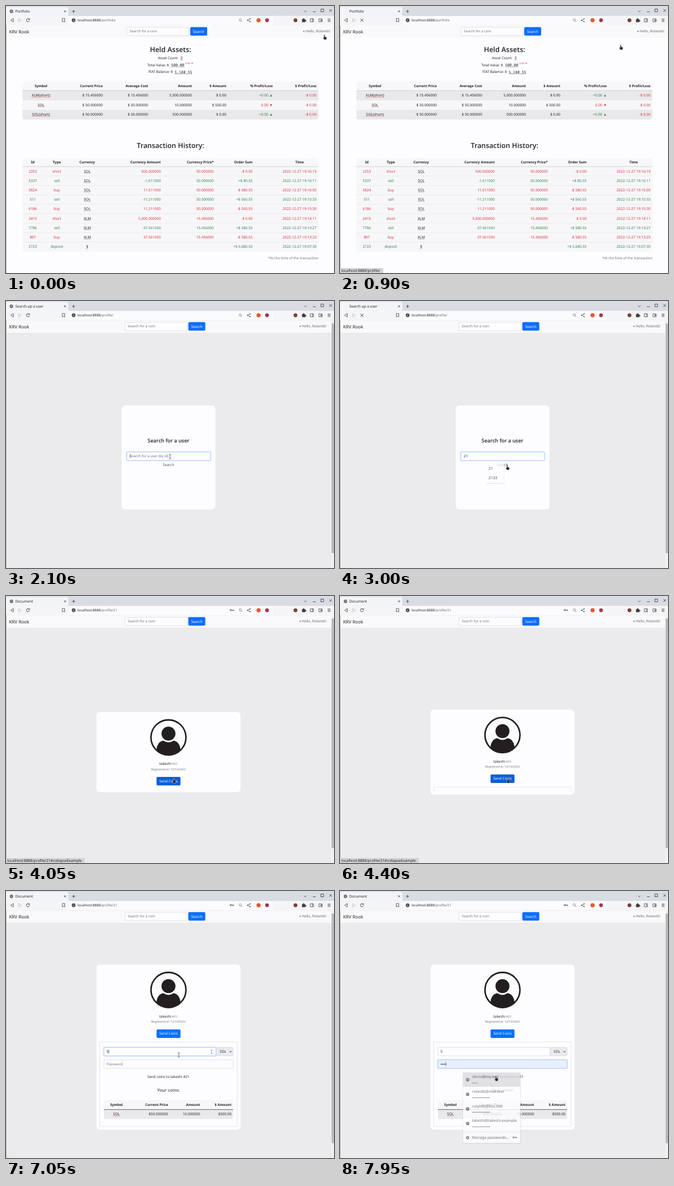
Animation of 600 by 487 pixels, one loop 8000 ms. Source, as an HTML page:

```html
<!DOCTYPE html>
<html lang="en">
<head>
<meta charset="utf-8">
<title>Coin portfolio</title>
<style>
html, body { margin: 0; width: 100%; height: 100%; overflow: hidden; background: #fdfcfe; }
#stage { display: block; width: 100vw; height: 100vh; }
text { font-family: "Noto Sans", "Open Sans", sans-serif; text-rendering: geometricPrecision; white-space: pre; }
.mono { font-family: "Noto Sans Mono", "DejaVu Sans Mono", monospace; }
.heading { font-family: "Open Sans", "Noto Sans", sans-serif; font-weight: 600; }
</style>
</head>
<body>
<svg id="stage" viewBox="0 0 600 487" preserveAspectRatio="none"></svg>
<script>
const LOOP = 8000;
const INK = '#222125', GREY = '#727176', RED = '#d6323f', GREEN = '#24874a', BLUE = '#0d6efd',
      PAPER = '#fdfcfe', PAGE = '#ebeaec', STRIPE = '#e9e8ea', PALE = '#f7f6f8', EDGE = '#d5d5da',
      LINK = '#dd4a55';
const BRAND = 'KRV Rook', USER = 'Rolands', PEER = 'takeshi';
const stage = document.getElementById('stage');

// ---- drawing helpers (text y is the visual middle of the line) ----
const text = (x, y, s, { size = 6.45, fill = INK, anchor = 'start', weight = 400, cls = '' } = {}) =>
  `<text x="${x}" y="${y + size * .35}" font-size="${size}" fill="${fill}" text-anchor="${anchor}" font-weight="${weight}" class="${cls}">${s}</text>`;
const mid = (x, y, s, o) => text(x, y, s, { ...o, anchor: 'middle' });
const heading = (x, y, s, size, fill) => mid(x, y, s, { size, fill, cls: 'heading' });
const rect = (x, y, w, h, fill, r = 0, extra = '') =>
  `<rect x="${x}" y="${y}" width="${w}" height="${h}" rx="${r}" fill="${fill}" ${extra}/>`;
const path = (d, stroke = '#3c3c42', width = .9, fill = 'none') =>
  `<path d="${d}" stroke="${stroke}" stroke-width="${width}" fill="${fill}"/>`;
const circle = (x, y, r, fill, extra = '') => `<circle cx="${x}" cy="${y}" r="${r}" fill="${fill}" ${extra}/>`;
const group = (s, attrs) => `<g ${attrs}>${s}</g>`;
const stroke = (color, width = .7) => `stroke="${color}" stroke-width="${width}"`;
const underline = (x, y, w, color) =>
  `<path d="M${x} ${y}h${w}" stroke="${color}" stroke-width=".7" stroke-dasharray="1.2 .6"/>`;

const between = (t, a, b) => t >= a && t < b;
const smooth = (t, a, b) => {
  const p = Math.min(1, Math.max(0, (t - a) / (b - a)));
  return p * p * (3 - 2 * p);
};

const field = (x, y, w, h, { focus = false, fill = PAPER } = {}) =>
  (focus ? rect(x - .6, y - .6, w + 1.2, h + 1.2, 'none', 2.4, stroke('#cfe2ff', 1.4)) : '') +
  rect(x, y, w, h, fill, 2, stroke(focus ? '#9cc4fb' : EDGE));
const button = (x, y, w, h, label, fill = BLUE) =>
  rect(x, y, w, h, fill, 2) + mid(x + w / 2, y + h / 2, label, { fill: '#fff', weight: 500 });
const globe = (x, y, r = 3.1) => circle(x, y, r, '#5b5d63') +
  path(`M${x - 2} ${y - 1}l1.6 1 .2 1.6M${x + .3} ${y - 2}l.4 1.3 1.4 .6`, '#e8e9ec', .8);
const key = (x, y) => circle(x - 2, y, 1.4, 'none', stroke('#444', .9)) + path(`M${x - .5} ${y}h4v1.5M${x + 2} ${y}v1.3`, '#444');

// columns: [x, anchor]; cells: strings or [string, colour]
const tableRow = (columns, cells, y, opts = {}) => cells.map((cell, i) => {
  const [s, fill = INK] = [].concat(cell);
  const [x, anchor] = columns[i];
  return text(x, y, s, { size: 6.55, fill, anchor, ...opts });
}).join('');
const headRow = (columns, cells, y) => tableRow(columns, cells, y, { size: 6.3, weight: 700 });

// ---- browser window ----
function browser({ title, url, loading, hasKey }) {
  const [host, slug] = url.split(/(?=\/)(.*)/s);
  const tools = '#3c3c42';
  return rect(0, 0, 600, 18.5, '#d9dce3') +
    path('M0 18.5V1.5H111Q114 1.5 114 5V18.5Z', 'none', 0, '#f3f4f7') +
    rect(0, 18, 600, 17.5, '#f5f5f8') + rect(114, 19, 374, 15.5, '#fbfbfd', 2) +
    (loading ? '' : globe(10, 9.7)) + text(17, 9.8, title, { size: 6.6 }) +
    path('M106.3 8l3.4 3.4M109.7 8l-3.4 3.4M120.8 9.8h5.6M123.6 7v5.6') +
    path('M545.2 8.6l2.2 2.2 2.2-2.2M561.5 10.5h5M576 5.5h5v5h-5zM591.6 6l4.4 4.4M596 6l-4.4 4.4', tools) +
    path('M13.3 22.8v6.4L8.4 26z', tools, .8) + path('M23.2 22.8v6.4l4.9-3.2z', '#b4b6bc', .8) +
    (loading ? path('M37.5 23.3l5.4 5.4M42.9 23.3l-5.4 5.4', tools, 1)
             : path('M42.6 24.3A2.9 2.9 0 1 0 43 26.6M43 22.6v2.1h-2.1', tools, 1)) +
    path('M103 22.8h4.4v6.4l-2.2-1.7-2.2 1.7z', tools, .8) +
    circle(123.7, 26, 3.4, '#4a4b50') + path('M123.7 25.5v2.4M123.7 23.8v.8', '#fff', .8) +
    text(131, 25.9, `${host}<tspan fill="#66676d">${slug || ''}</tspan>`, { size: 6.2 }) +
    (hasKey ? key(413, 25.7) : '') +
    circle(428.5, 25.3, 2.1, 'none', stroke('#77787e', .8)) + path('M430 26.9l2 2', '#77787e') +
    path('M446.5 23.4l-4.5 2.5 4.5 2.6', tools, .7) +
    [[446.5, 23.4], [442, 25.9], [446.5, 28.5]].map(([x, y]) => circle(x, y, 1, tools)).join('') +
    circle(462, 26, 3.8, '#f0532d') + circle(477.5, 26, 3.4, '#a8324f') + circle(529.5, 26, 3.5, '#7b3f36') +
    path('M541.5 24h2a1.2 1.2 0 1 1 2 0h2v2a1.2 1.2 0 1 1 0 1.8v1.6h-6z', 'none', 0, tools) +
    path('M556.5 23.2h6v5.6h-6zM560.5 23.2v5.6', tools, .8) +
    path('M572.3 23.4h5.8v5.4h-5.8zM575.6 25.4h2.6v1.6h-2.6z', tools, .8) +
    path('M588.5 23.8h5M588.5 26h5M588.5 28.2h5', tools, .9);
}

function navbar(shift, right) {
  return rect(0, 35.5, 600, 22.5, '#f9f9fb') + text(5.7, 46.7, BRAND, { size: 8.2 }) +
    field(221 - shift, 39, 114, 15) + text(226.3 - shift, 46, 'Search for a coin', { size: 6.4, fill: GREY }) +
    button(337 - shift, 38.6, 31, 15.4, 'Search') +
    path(`M${right - 47.5} 44.5v3.6l-2-1.8z`, 'none', 0, '#55545a') +
    text(right, 46, `Hello, ${USER}!`, { anchor: 'end', fill: '#66656b' });
}

const scrollbar = () => rect(595, 35.5, 5, 451.5, '#f1f0f3') + rect(595.7, 41, 4.3, 419, '#b8b7ba');
const statusBar = (s, w) => rect(0, 478, w, 9, '#d3d2d6', 1) + text(2.3, 483, s, { size: 6.75 });

// ---- portfolio ----
const assetColumns = [[64, 'middle'], [177, 'end'], [260, 'end'], [340, 'end'], [403, 'end'], [488, 'end'], [568, 'end']];
const assets = [
  ['XLM(short)', '15.456000', '5,000.000000', '0.00', ['+0.00 ▲', GREEN]],
  ['SOL', '50.000000', '10.000000', '500.00', ['0.00 ▼', RED]],
  ['SOL(short)', '50.000000', '500.000000', '0.00', ['+0.00 ▲', GREEN]],
];
const historyColumns = [[49, 'middle'], [93, 'middle'], [148.5, 'middle'], [283, 'end'], [380, 'end'], [451, 'end'], [537, 'middle']];
const history = `2253 short SOL 500.000000 50.000000 -$_0.00 19:16:19
5337 sell SOL -1.611000 50.000000 +$_80.55 19:16:11
5824 buy SOL 11.611000 50.000000 -$_580.55 19:16:05
511 sell SOL -11.211000 50.000000 +$_560.55 19:15:33
6186 buy SOL 11.211000 50.000000 -$_560.55 19:15:30
2415 short XLM 5,000.000000 15.456000 -$_0.00 19:14:11
7786 sell XLM -37.561500 15.456000 +$_580.55 19:13:27
897 buy XLM 37.561500 15.456000 -$_580.55 19:13:23
2723 deposit $ . . +$_5,680.55 19:07:30`.split('\n').map(line =>
  line.split(' ').map(s => s === '.' ? '' : s.replace('_', ' ')));

// label, x of the label, x and content of the underlined value
const summary = [['Asset Count:', 278, 319, '3'], ['Total Value: $', 258.5, 302, '500.00'], ['FIAT Balance: $', 260.5, 308.5, '5,180.55']];

function portfolio() {
  const headLine = '#c4c3c8';
  let s = rect(0, 35, 600, 452, PAPER) + navbar(0, 593) + heading(301, 79.5, 'Held Assets:', 12.9);
  summary.forEach(([label, x, valueX, value], i) => {
    const y = 94.6 + i * 12.8;
    s += text(x, y, label, { size: 6.35 }) + text(valueX, y, value, { cls: 'mono', size: 6.7 }) +
      underline(valueX, y + 3.7, value.length * 4, '#55545a');
  });
  s += text(328.3, 104.5, '0.00 ▼', { size: 4.4, fill: RED });

  s += rect(30, 138, 541.5, 69, PALE, 5);
  s += rect(30, 154.3, 541.5, 17.7, STRIPE) + path('M30 189.5H571.5V202Q571.5 207 566.5 207H35Q30 207 30 202Z', 'none', 0, STRIPE);
  s += path('M30 154.3h541.5', headLine, .7);
  s += headRow(assetColumns, ['Symbol', 'Current Price', 'Average Cost', 'Amount', '$ Amount', '% Profit/Loss', '$ Profit/Loss'], 145.8);
  assets.forEach(([symbol, price, amount, value, change], i) => {
    const y = 163 + i * 17.4, w = symbol.length > 3 ? 34 : 12;
    s += tableRow(assetColumns, [symbol, '$ ' + price, '$ ' + price, amount, '$ ' + value, change, ['-$ 0.00', RED]], y) +
      underline(64 - w / 2, y + 3.5, w, LINK);
  });

  s += heading(301, 255, 'Transaction History:', 12.8) + rect(30, 277, 541.5, 171, PALE, 5) +
    headRow(historyColumns, ['Id', 'Type', 'Currency', 'Currency Amount', 'Currency Price*', 'Order Sum', 'Time'], 284.7) +
    path('M30 293h541.5', headLine, .7);
  history.forEach(([id, type, coin, amount, price, sum, time], i) => {
    const y = 301.4 + i * 17.2, c = /sell|deposit/.test(type) ? GREEN : RED, w = coin === '$' ? 4 : 12;
    s += tableRow(historyColumns, [[id, c], [type, c], coin, [amount, c], [price, c], [sum, c], ['2022-12-27 ' + time, c]], y) +
      underline(148.5 - w / 2, y + 3.5, w, '#7a5a60') +
      (i < 8 ? path(`M30 ${y + 8.7}h541.5`, '#e4e3e7', .6) : '');
  });
  return s + text(571.5, 460, '*At the time of the transaction', { anchor: 'end', fill: GREY });
}

// ---- user search ----
function userSearch(t) {
  const focus = t >= 2050;
  const typed = t < 2300 ? '' : t < 2500 ? '2' : '21';
  let s = rect(211, 190, 172.5, 190.5, PAPER, 7, stroke('#e4e3e6', .5)) +
    heading(297.2, 255.2, 'Search for a user', 9.4) +
    field(221, 275.5, 153, 15.3, { focus }) +
    text(226.5, 283, typed || 'Search for a user (by id)', { fill: typed ? INK : GREY, size: 6.4 }) +
    mid(297.2, 299, 'Search', { fill: '#4b4a50' });
  if (focus && t < 2900 && t % 1000 < 500) s += path(`M${226.8 + typed.length * 3.7} 279.5v7`, INK, .6);
  if (between(t, 2300, 3200)) s += group(
    rect(267.5, 296.5, 33, 37, '#a9a8ad', 1, 'opacity=".35"') + rect(266.8, 294.5, 33, 37.5, PAPER, 1) +
    text(271.7, 306, '21', { size: 7.1 }) + text(271.7, 322.8, '2133', { size: 7.1 }),
    `opacity="${1 - smooth(t, 2900, 3200) * .9}"`);
  return s;
}

// ---- profile with collapsible transfer form ----
const coinColumns = [[202, 'middle'], [296.5, 'end'], [355, 'end'], [412.5, 'end']];

function avatar(x, y) {
  const black = '#231f20';
  return group(circle(0, 0, 32, PAPER, stroke(black, 2.8)) +
    path('M-22 24.5C-22 12-15 6-9 6Q0 12 9 6C15 6 22 12 22 24.5A33 33 0 0 1-22 24.5Z', 'none', 0, black) +
    circle(0, -7, 12.8, black), `transform="translate(${x} ${y})"`);
}

function transferForm(t) {
  const amount = t >= 6600, onAmount = between(t, 6150, 7400), onPassword = t >= 7400, filled = t >= 7880;
  const onSelect = between(t, 5200, 6150);
  let s = rect(171.5, .4, 251.5, 154, PAPER, 1, stroke('#dddce0', .8)) +
    rect(384, 10.5, 31.5, 15.3, '#e9ecef', 2, stroke(onSelect ? '#252528' : EDGE, onSelect ? 1.5 : .7)) +
    text(391, 18.3, 'SOL') + path('M408.8 17.3l1.9 1.9 1.9-1.9', INK, 1) +
    field(179, 10.5, 205, 15.3, { focus: onAmount }) +
    text(184, 18.2, amount ? '5' : 'Coin Amount', { fill: amount ? INK : GREY }) +
    (t < 7400 ? path('M374.2 16.4l1.7-2 1.7 2zM374.2 20l1.7 2 1.7-2z', 'none', 0, '#66656b') : '');
  if (onAmount && t % 1000 < 500) s += path(`M${amount ? 188 : 184} 14.7v7`, INK, .6);
  if (amount) {
    s += field(179, 33.2, 236.5, 15.3, { focus: onPassword, fill: filled ? '#e8f0fe' : PAPER });
    s += filled ? [0, 1, 2, 3].map(i => circle(185.2 + i * 2.4, 41, .9, INK)).join('') + path('M194 37.3v7', INK, .6)
                : text(184, 41, 'Password', { fill: GREY });
  }
  return s + mid(297.2, 63.5, `Send coins to ${PEER} #21`) +
    heading(297.2, 88.4, 'Your coins:', 7.9, '#4b4a50') +
    rect(179, 106.5, 236.5, 34.5, PALE, 4) + path('M179 123.8H415.5V137Q415.5 141 411.5 141H183Q179 141 179 137Z', 'none', 0, STRIPE) +
    path('M179 123.8h236.5', '#55545a', .9) +
    headRow(coinColumns, ['Symbol', 'Current Price', 'Amount', '$ Amount'], 115) +
    tableRow(coinColumns, ['SOL', '$50.000000', '10.000000', '$500.00'], 132) + underline(196, 135.6, 12, LINK);
}

function profile(t) {
  const open = 155 * smooth(t, 4350, 4700), top = 284.8 - (147 + open) / 2;
  const hover = between(t, 3600, 4450);
  return group(rect(165, 0, 264.5, 147 + open, PAPER, 7, stroke('#e4e3e6', .5)) + avatar(297.2, 46.7) +
    mid(297.2, 94.8, `${PEER} <tspan font-size="5.6" fill="${GREY}">#21</tspan>`, { size: 6.4 }) +
    mid(297.2, 104.4, 'Registered at: 12/14/2022', { size: 5.25, fill: GREY }) +
    button(275.4, 118.6, 43.8, 15.6, 'Send Coins', hover ? '#0b5ed7' : BLUE) +
    (open ? `<svg x="0" y="141" width="600" height="${open}">${transferForm(t)}</svg>` : ''),
    `transform="translate(0 ${top})"`);
}

const logins = [['demo@my.test', 4], ['rolands@mail.test', 12], ['rolands@box.test', 12], ['takeshi@takeshi.example', 12]];

function passwordMenu(t) {
  let s = rect(224.5, 331.5, 106, 129.5, '#a9a8ad', 1, 'opacity=".4"') + rect(225, 331, 104.7, 128.7, PAPER, 1);
  if (t >= 7720) s += rect(225, 331, 104.7, 26, '#dcdbde');
  logins.forEach(([name, dots], i) => {
    const y = 339 + i * 26.6;
    s += globe(233.5, y + 5.2) + text(241.7, y, name, { size: 6.85, fill: '#55545a' });
    for (let d = 0; d < dots; d++) s += circle(243 + d * 2.75, y + 11.3, .9, '#66656b');
  });
  return group(s + path('M225 439.5h104.7', '#dddce0', .7) + circle(233.5, 450, 2, 'none', stroke('#55545a', 1.6)) +
    text(241.7, 450, 'Manage passwords…', { size: 6.85, fill: '#55545a' }) + key(319.5, 449.5),
    `opacity="${1 - .25 * smooth(t, 7860, 8000)}"`);
}

// ---- mouse pointer ----
const route = [[0, 582.7, 52.3], [250, 582.7, 52.3], [800, 514, 70], [1150, 512, 73.5], [1350, 512, 73.5], [2000, 300, 284],
  [2400, 300, 284], [2750, 306, 299], [3350, 306, 299], [3700, 307, 332], [4450, 307, 332], [5100, 398, 294],
  [5450, 398, 294], [5750, 340.5, 298.5], [6000, 316, 299], [7150, 316, 299], [7400, 290, 316], [7550, 290, 316],
  [7850, 285.5, 337.5], [LOOP, 285.5, 337.5]];
const shapes = {
  arrow: path('M0 0V8L1.8 6.4 3 9.3 4.4 8.7 3.2 5.9H5.6Z', '#fff', .5, '#2b2a2e'),
  hand: path('M-1.2 .6Q-.2-.6 .6 .7V3.6L3.2 4.2Q4.2 4.6 3.9 6.2L3.2 9.3H-.6L-2.8 6Q-3 4.7-1.2 5.4Z', '#fff', .4, '#2b2a2e'),
  beam: path('M-1.8-4Q0-4 0-3Q0-4 1.8-4M0-3V3M-1.8 4Q0 4 0 3Q0 4 1.8 4', '#55545a', .9),
};
const shapeTimes = [[0, 'hand'], [350, 'arrow'], [700, 'hand'], [1050, 'arrow'], [1950, 'beam'], [2620, 'hand'], [3250, 'arrow'],
  [3600, 'hand'], [4450, 'arrow'], [5520, 'beam'], [7680, 'hand']];

function pointer(t) {
  const i = route.findIndex(([end]) => end > t);
  const [t0, x0, y0] = route[i - 1], [t1, x1, y1] = route[i], p = smooth(t, t0, t1);
  const shape = shapeTimes.findLast(([start]) => start <= t)[1];
  return group(shapes[shape], `transform="translate(${x0 + (x1 - x0) * p} ${y0 + (y1 - y0) * p})"`);
}

function scene(t) {
  const loading = between(t, 900, 1000) || between(t, 2900, 3300);
  let s;
  if (t < 1000) {
    s = portfolio() + browser({ title: 'Portfolio', url: 'localhost:8888/portfolio', loading });
  } else {
    const searching = t < 3300;
    s = rect(0, 35, 600, 452, PAGE) + navbar(3.5, 586) + scrollbar() + (searching ? userSearch(t) : profile(t)) +
      browser({
        title: searching ? 'Search up a user' : 'Document',
        url: 'localhost:8888/profile/' + (searching ? '' : '21'),
        loading, hasKey: !searching,
      });
  }
  s += rect(0, 35, .8, 452, '#a3a3a8');
  if (between(t, 900, 1450)) s += statusBar('localhost:8888/profile/', 79);
  if (between(t, 3600, 4500)) s += statusBar('localhost:8888/profile/21#collapseExample', 144);
  if (t >= 7450) s += passwordMenu(t);
  return s + pointer(t);
}

function tick() {
  stage.innerHTML = scene(performance.now() % LOOP);
  requestAnimationFrame(tick);
}
tick();
</script>
</body>
</html>
```
